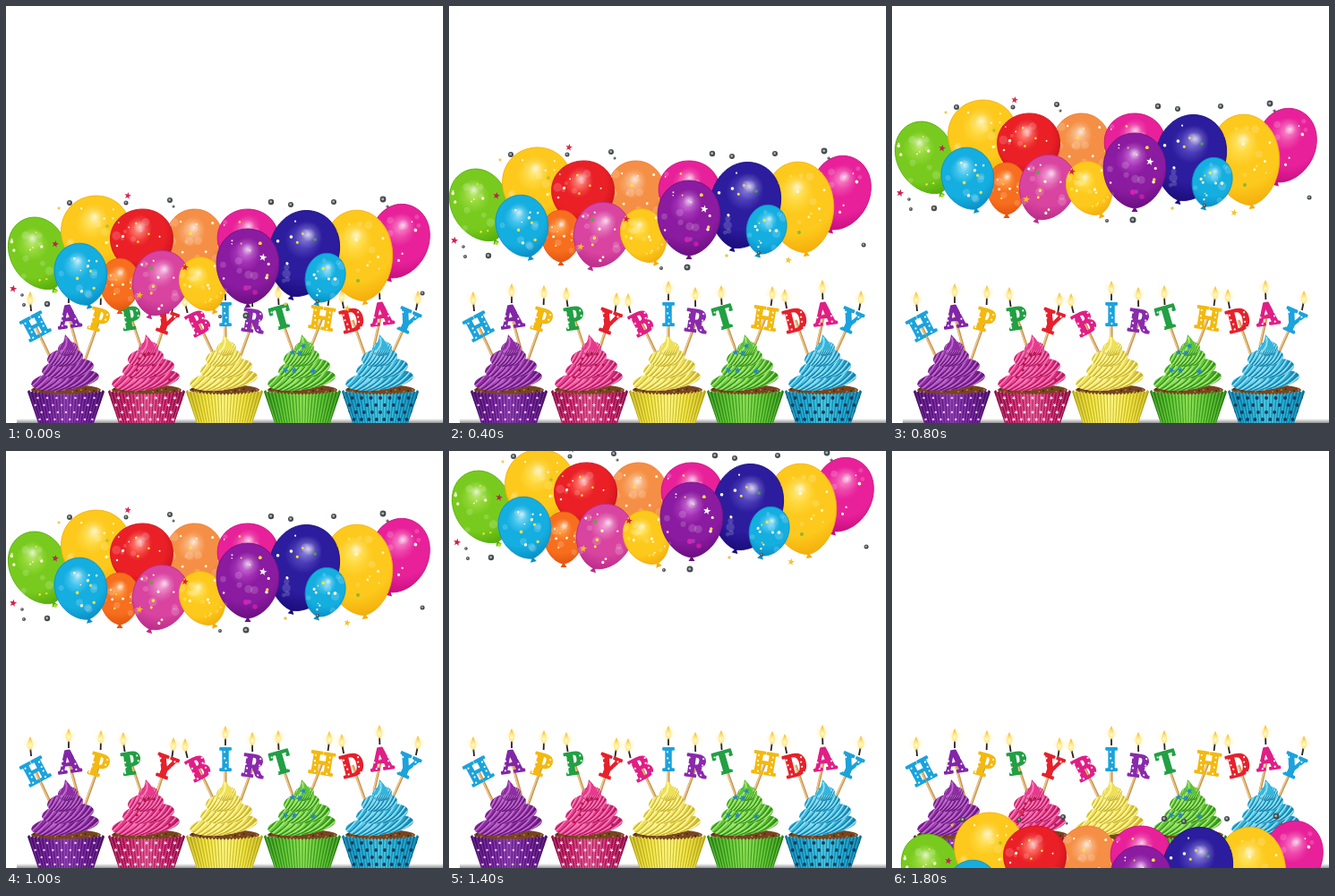
An HTML page with a canvas that plays this animation: 488x466 px, repeating every 2000 ms.

```html
<!DOCTYPE html>
<html lang="en">
<head>
<meta charset="utf-8">
<title>Happy Birthday</title>
<style>
html, body { margin: 0; width: 100%; height: 100%; overflow: hidden; background: #fff; }
canvas { display: block; }
</style>
</head>
<body>
<canvas id="stage" width="488" height="466"></canvas>
<script>
const stage = document.getElementById('stage');
const W = 488, H = 466, STEP = 200;
let ctx;

// Balloon group shift for each 200 ms step
const shifts = [[0, 146], [3, 125], [-2, 92], [0, 66], [1, 39], [0, 0], [6, -36], [1, -68], [2, -104], [8, 338]];

const hues = {
  green: ['#a9e24c', '#78cb1e', '#55ad0c'],
  yellow: ['#ffe252', '#fdc91c', '#f3ae0c'],
  red: ['#ff6556', '#ea2026', '#c9101c'],
  peach: ['#fab985', '#f58f45', '#ee7a2e'],
  pink: ['#f666bb', '#e8219a', '#c90e80'],
  navy: ['#6458cc', '#2c1c9e', '#1b0c7c'],
  sky: ['#62d2f5', '#14aee0', '#0a8fc6'],
  orange: ['#ffa048', '#f76f1e', '#e5560f'],
  orchid: ['#f08acc', '#d8449f', '#bb2c8a'],
  purple: ['#ba48ca', '#8b1ba0', '#6b0e82']
};

// hue, centre, radii, knot
const balloons = [
  ['green', 37, 131, 32, 42, 56, 176],
  ['yellow', 101, 109, 39, 43, 106, 152],
  ['peach', 211, 118, 32, 37, 214, 155],
  ['red', 152, 117, 35, 36, 158, 154],
  ['pink', 270, 116, 34, 35, 268, 151],
  ['pink', 439, 117, 33, 42, 428, 160],
  ['yellow', 394, 133, 38, 51, 401, 186],
  ['navy', 332, 131, 39, 49, 318, 182],
  ['orange', 127, 165, 22, 29, 127, 195],
  ['sky', 84, 154, 29, 35, 93, 190],
  ['orchid', 172, 164, 31, 37, 160, 202],
  ['yellow', 220, 165, 25, 31, 233, 196],
  ['purple', 270, 145, 35, 42, 270, 188],
  ['sky', 356, 158, 22, 28, 347, 187]
];

// letter, colour, centre, degrees, flame, stick end
const candles = [
  ['H', '#1ba3dc', 33, 358, -28, 27, 327, 50, 394],
  ['A', '#8226a8', 70, 347, -8, 70, 318, 82, 390],
  ['P', '#f3b90f', 104, 351, 15, 106, 320, 86, 402],
  ['P', '#22a044', 140, 349, -9, 131, 322, 152, 385],
  ['Y', '#e6212c', 178, 353, 20, 187, 328, 166, 390],
  ['B', '#e01f86', 215, 354, -27, 200, 329, 234, 394],
  ['I', '#1ba3dc', 245, 345, 0, 245, 315, 245, 380],
  ['R', '#8a2aac', 276, 352, 8, 275, 322, 260, 396],
  ['T', '#22a044', 307, 348, -16, 304, 320, 322, 390],
  ['H', '#f3b90f', 353, 349, 9, 361, 321, 338, 388],
  ['D', '#e6212c', 387, 351, -14, 375, 324, 403, 396],
  ['A', '#e01f86', 419, 344, -8, 417, 314, 411, 380],
  ['Y', '#1ba3dc', 448, 352, 24, 460, 326, 428, 396]
];

// centre, frosting light / main / dark, wrapper light / main / dark, pattern
const cakes = [
  [67, '#bd68cb', '#8f2da3', '#65187a', '#9646b9', '#6b1b93', '#451063', 'dots'],
  [157, '#fa79b4', '#e73a8c', '#b31c62', '#e9609b', '#c51c66', '#850e42', 'flowers'],
  [244, '#fff59b', '#eee057', '#c9b42d', '#fff783', '#e8db31', '#b4a413', 'plain'],
  [331, '#a5e66e', '#5fc339', '#31911d', '#8fe354', '#4fb829', '#267d15', 'plain'],
  [418, '#8ddff2', '#35b5db', '#1581ac', '#4ccbe5', '#159fca', '#0b6f98', 'holes']
];

function seeded(seed) {
  return () => {
    seed = (seed * 16807) % 2147483647;
    return seed / 2147483647;
  };
}

function disc(x, y, r, fill) {
  ctx.fillStyle = fill;
  ctx.beginPath();
  ctx.arc(x, y, r, 0, 7);
  ctx.fill();
}

function line(x1, y1, x2, y2, width, color) {
  ctx.strokeStyle = color;
  ctx.lineWidth = width;
  ctx.beginPath();
  ctx.moveTo(x1, y1);
  ctx.lineTo(x2, y2);
  ctx.stroke();
}

function star(x, y, r, fill, turn = 0.2) {
  ctx.fillStyle = fill;
  ctx.beginPath();
  for (let i = 0; i < 10; i++) {
    const a = turn + i * Math.PI / 5 - Math.PI / 2, d = i % 2 ? r * 0.42 : r;
    ctx.lineTo(x + d * Math.cos(a), y + d * Math.sin(a));
  }
  ctx.fill();
}

function fade(x, y, r, ...stops) {
  const g = ctx.createRadialGradient(x, y, 0, x, y, r);
  stops.forEach((c, i) => g.addColorStop(i / (stops.length - 1), c));
  return g;
}

function balloon([hue, x, y, rx, ry, kx, ky], index) {
  const [light, main, dark] = hues[hue];
  const rand = seeded(97 + index * 531);
  ctx.save();
  ctx.translate(x, y);
  ctx.rotate(Math.atan2(x - kx, ky - y));
  ctx.fillStyle = dark;
  ctx.beginPath();
  ctx.moveTo(0, ry - 2);
  ctx.lineTo(3.5, ry + 4);
  ctx.lineTo(-3.5, ry + 4);
  ctx.fill();
  ctx.beginPath();
  ctx.moveTo(0, -ry);
  ctx.bezierCurveTo(rx * 0.57, -ry, rx, -ry * 0.6, rx, -ry * 0.08);
  ctx.bezierCurveTo(rx, ry * 0.5, rx * 0.48, ry * 0.96, 0, ry);
  ctx.bezierCurveTo(-rx * 0.48, ry * 0.96, -rx, ry * 0.5, -rx, -ry * 0.08);
  ctx.bezierCurveTo(-rx, -ry * 0.6, -rx * 0.57, -ry, 0, -ry);
  ctx.fillStyle = fade(-rx * 0.1, -ry * 0.3, ry * 1.3, light, main, main, dark);
  ctx.fill();
  ctx.strokeStyle = dark;
  ctx.lineWidth = 0.8;
  ctx.stroke();
  ctx.clip();
  disc(0, -ry * 0.45, rx * 0.4, fade(0, -ry * 0.45, rx * 0.4, 'rgba(255,255,255,.75)', 'rgba(255,255,255,.15)', 'rgba(255,255,255,0)'));
  for (let i = 0; i < 7; i++) {
    disc((rand() - 0.5) * rx * 1.6, (rand() - 0.5) * ry * 1.5, 2 + rand() * 3, 'rgba(255,255,255,.16)');
  }
  for (let i = 0; i < 9; i++) {
    disc((rand() - 0.5) * rx * 1.7, (rand() - 0.5) * ry * 1.5, 0.8 + rand() * 1.1, i % 3 ? '#fff8d8' : '#ffe13a');
  }
  ctx.restore();
}

function confetti() {
  const beads = [[71, 74, 3], [134, 74, 2.5], [183, 71, 3], [187, 78, 1.5], [296, 73, 3.2], [318, 76, 3], [366, 73, 3],
    [421, 70, 3.4], [426, 78, 1.6], [465, 175, 2.5], [18, 177, 1.8], [20, 188, 2], [46, 187, 3.2],
    [239, 201, 2], [268, 200, 3.5], [348, 184, 2]];
  for (const [x, y, r] of beads) {
    disc(x, y, r, '#454b4d');
    disc(x - 0.3, y - 0.3, r * 0.45, '#aab0b1');
  }
  star(136, 66, 4, '#d92850');
  star(8, 170, 4.3, '#d3204c');
  star(55, 120, 4, '#bd2350');
  star(200, 146, 4, '#d21e50');
  star(149, 177, 4.2, '#f9bd20');
  star(381, 192, 4, '#f3c42d');
  star(287, 135, 4.5, '#fff');
  star(59, 80, 2.3, '#f4c53b');
  disc(312, 187, 1.8, '#eac653');
  disc(162, 147, 2, '#58ac30');
  disc(393, 161, 2, '#8db82a');
  disc(345, 115, 1.8, '#46a44a');
  disc(113, 100, 1.8, '#b0c12c');
  disc(268, 169, 3, '#d023b1');
  disc(278, 174, 2.8, '#c01da8');
  disc(55, 173, 2, '#a6e52a');
}

function stick([, , x, y, , , , ex, ey]) {
  line(x, y, ex, ey, 3, '#c9944e');
  line(x - 0.6, y, ex - 0.6, ey, 1.2, '#f0cf94');
}

function candle([char, color, x, y, deg, fx, fy], index) {
  const rand = seeded(41 + index * 77);
  const a = deg * Math.PI / 180;
  line(fx, fy + 3, fx + (x - fx) * 0.18, fy + 14, 1.8, '#2c211d');
  ctx.save();
  ctx.translate(x, y);
  ctx.rotate(a);
  ctx.font = 'bold 34px "Noto Serif", serif';
  ctx.textAlign = 'center';
  ctx.lineJoin = 'round';
  ctx.strokeStyle = ctx.fillStyle = color;
  ctx.lineWidth = 2;
  ctx.strokeText(char, 0, 12);
  ctx.fillText(char, 0, 12);
  ctx.globalCompositeOperation = 'source-atop';
  for (let i = 0; i < 4; i++) {
    for (const side of char === 'I' ? [0] : [-7.5, 7.5]) {
      disc(side + rand() * 2 - 1, -9 + i * 6 + rand() * 2, 1.1, '#fff');
    }
  }
  ctx.restore();
  disc(fx, fy, 9, fade(fx, fy, 9, 'rgba(255,226,105,.65)', 'rgba(255,238,155,.3)', 'rgba(255,250,220,0)'));
  ctx.fillStyle = fade(fx, fy + 2, 9, '#fffbd7', '#ffe275', '#f5b32e');
  ctx.beginPath();
  ctx.moveTo(fx, fy - 8);
  ctx.bezierCurveTo(fx + 2, fy - 3, fx + 6, fy + 4, fx, fy + 7);
  ctx.bezierCurveTo(fx - 6, fy + 4, fx - 2, fy - 3, fx, fy - 8);
  ctx.fill();
}

function frosting(x, light, main, dark) {
  const tiers = [[418, 38, 11], [405, 29, 11], [393, 20, 10], [383, 11, 8]];
  tiers.forEach(([y, rx, ry], n) => {
    ctx.save();
    ctx.translate(x + (n % 2 ? 2 : -1), y);
    ctx.rotate(-0.12);
    ctx.beginPath();
    ctx.ellipse(0, 0, rx, ry, 0, 0, 7);
    ctx.fillStyle = fade(-rx * 0.25, -ry * 0.3, rx * 1.2, light, main, main, dark);
    ctx.fill();
    ctx.clip();
    for (let i = -5; i < 6; i++) {
      const sx = i * rx / 4.2;
      [[0, dark, 1.5], [2, light, 1.8]].forEach(([d, color, width]) => {
        ctx.strokeStyle = color;
        ctx.lineWidth = width;
        ctx.beginPath();
        ctx.moveTo(sx - rx * 0.5, ry + d);
        ctx.quadraticCurveTo(sx + rx * 0.1, ry * 0.7 + d, sx + rx * 0.55, -ry + d);
        ctx.stroke();
      });
    }
    ctx.restore();
  });
  ctx.fillStyle = main;
  ctx.beginPath();
  ctx.moveTo(x - 9, 384);
  ctx.quadraticCurveTo(x - 2, 378, x - 1, 367);
  ctx.quadraticCurveTo(x + 8, 376, x + 10, 385);
  ctx.fill();
  ctx.strokeStyle = light;
  ctx.lineWidth = 2;
  ctx.beginPath();
  ctx.moveTo(x, 370);
  ctx.quadraticCurveTo(x + 3, 380, x - 6, 387);
  ctx.stroke();
}

function wrapper(x, light, main, dark, pattern) {
  ctx.fillStyle = '#77451f';
  ctx.beginPath();
  ctx.ellipse(x, 429, 39, 6, 0, 0, 7);
  ctx.fill();
  for (let i = 0; i < 16; i++) disc(x - 36 + i * 4.8, 428 + i * 7 % 4, 1, i % 2 ? '#b57a3b' : '#4b2813');
  const rim = u => 434 - 4 * u * u;
  ctx.save();
  ctx.beginPath();
  for (let i = 0; i <= 44; i++) {
    const u = i / 22 - 1;
    ctx.lineTo(x + u * 43, rim(u) + (i % 2 ? -1.3 : 1));
  }
  ctx.lineTo(x + 31, H);
  ctx.lineTo(x - 31, H);
  ctx.closePath();
  const g = ctx.createLinearGradient(x - 43, 0, x + 43, 0);
  [dark, main, light, main, dark].forEach((c, i) => g.addColorStop(i / 4, c));
  ctx.fillStyle = g;
  ctx.fill();
  ctx.clip();
  for (let i = 0; i <= 22; i++) {
    const u = i / 11 - 1;
    ctx.globalAlpha = 0.6;
    line(x + u * 43, 428, x + u * 31, H, 1.2, dark);
    line(x + u * 43 + 1.7, 428, x + u * 31 + 1.3, H, 0.9, light);
  }
  ctx.globalAlpha = 1;
  if (pattern !== 'plain') {
    for (let row = 0; row < 4; row++) {
      for (let i = -4; i < 5; i++) {
        const px = x + (i + (row % 2) / 2) * (10.5 - row * 0.7), py = 438 + row * 8;
        if (pattern === 'flowers') star(px, py, 2.5, '#f9d7e6', i);
        else disc(px, py, pattern === 'dots' ? 1.3 : 2, pattern === 'dots' ? '#dec1ec' : '#193c58');
      }
    }
  }
  ctx.restore();
}

function sprinkles() {
  const rand = seeded(613);
  for (let i = 0; i < 12; i++) {
    const y = 388 + rand() * 32, spread = (y - 374) * 1.2;
    disc(157 + (rand() - 0.5) * spread, y, 1.5, '#bd1347');
  }
  [[320, 387], [332, 380], [328, 388], [312, 407], [322, 407], [343, 408]].forEach(([x, y], i) => star(x, y, 4, '#2789bd', i));
}

function makeLayer(paint) {
  const layer = document.createElement('canvas');
  layer.width = W;
  layer.height = H;
  ctx = layer.getContext('2d');
  paint();
  return layer;
}

const letterLayer = makeLayer(() => candles.forEach(candle));
const tableLayer = makeLayer(() => {
  ctx.fillStyle = '#fff';
  ctx.fillRect(0, 0, W, H);
  const shade = ctx.createLinearGradient(0, 461, 0, H);
  shade.addColorStop(0, 'rgba(120,120,120,0)');
  shade.addColorStop(1, 'rgba(110,110,110,.75)');
  ctx.fillStyle = shade;
  ctx.fillRect(12, 461, 476, 5);
  candles.forEach(stick);
  for (const [x, fl, fm, fd, wl, wm, wd, pattern] of cakes) {
    wrapper(x, wl, wm, wd, pattern);
    frosting(x, fl, fm, fd);
  }
  sprinkles();
  ctx.drawImage(letterLayer, 0, 0);
});
const balloonLayer = makeLayer(() => {
  balloons.forEach(balloon);
  confetti();
});

const view = stage.getContext('2d');
let shown = -1;

function draw(now) {
  const step = Math.floor(now / STEP) % shifts.length;
  if (step !== shown) {
    shown = step;
    view.drawImage(tableLayer, 0, 0);
    view.drawImage(balloonLayer, ...shifts[step]);
  }
}

let start;
function tick(now) {
  start ??= now;
  draw(now - start);
  requestAnimationFrame(tick);
}
draw(0);
requestAnimationFrame(tick);
</script>
</body>
</html>
```
